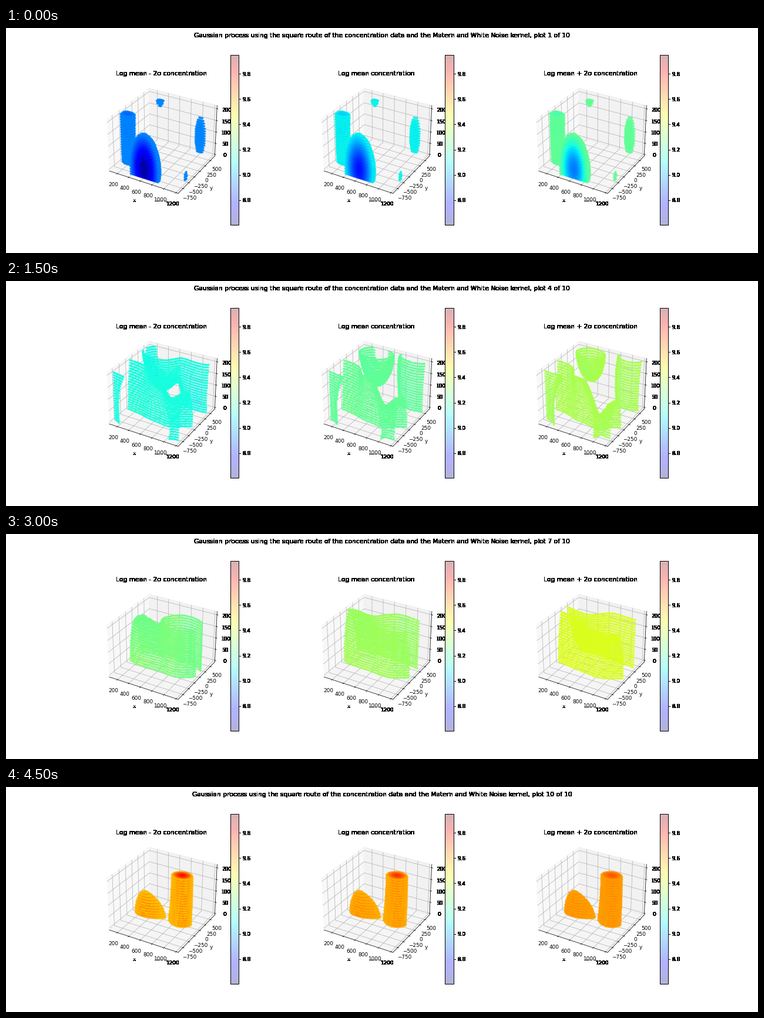
A matplotlib script that plays this animation: 1280x384 px, repeating every 5 s.

```python
import numpy as np
import matplotlib.pyplot as plt
from matplotlib.animation import FuncAnimation
from matplotlib.cm import ScalarMappable
from matplotlib.colors import Normalize

W, H, DPI = 1280, 384, 64
PLOTS = 10
LOW = np.array([53.7, -949.0, -7.5])
SPAN = np.array([1180.0, 1675.0, 221.5])

# Gaussian bumps in unit box coordinates: amplitude, x, y, z, vertical width
WELLS = [(-.21, .12, .29, .5, 3), (-.39, .5, .04, .2, .73), (-.175, .28, .8, 1, .75),
         (-.185, .8, .97, .35, 1.2), (-.172, .98, .28, .1, .6)]
PEAKS = [(.34, .74, .56, .5, 3), (.31, .17, .52, 0, .75), (.2, .38, .58, 0, .6)]
BACKGROUND = .53

# sign of the two sigma shift in each panel
PANELS = [("Log mean - 2σ concentration", -1),
          ("Log mean concentration", 0),
          ("Log mean + 2σ concentration", 1)]


def make_field(shape):
    x, y, z = np.meshgrid(*(np.linspace(.042, .958, n) for n in shape), indexing="ij")
    total = np.full(shape, BACKGROUND)
    for bumps, width in ((WELLS, .18), (PEAKS, .15)):
        for amp, cx, cy, cz, tall in bumps:
            r2 = ((x - cx) / (1.2 * width)) ** 2 + ((y - cy) / width) ** 2
            total += amp * np.exp(-r2 - ((z - cz) / tall) ** 2)
    return (x, y, z), total


def level(plot, sign):
    """Cubic rise of the level; the shifted panels run ahead or behind midway."""
    step = plot - .9 * sign * np.sin(np.pi * plot / (PLOTS - 1))
    return np.polyval([.00081, .0022, .0228, .4985], step - (PLOTS - 1) / 2)


def select(plot, sign):
    """Solid regions at both ends, thin level surfaces in between."""
    inside = values > level(plot, sign)
    if plot == 0:
        return ~inside
    if plot == PLOTS - 1:
        return inside
    edge = np.zeros_like(inside)
    for axis in range(3):
        crossing = np.diff(inside, axis=axis)
        np.moveaxis(edge, axis, 0)[1:] |= np.moveaxis(crossing, axis, 0)
    return edge


def tone(value, sign):
    return value + sign * (.105 - .4 * np.maximum(value - .5, 0))


def solid(img, dpi):
    """Turn every touched pixel fully black, as lost transparency does."""
    out = np.zeros_like(img)
    out[..., 3] = img[..., 3] > 0
    return out, 0, 0


def add_text(x, y, text, va):
    label = fig.text(x, y, text, ha="center", va=va, size=12)
    label.set_agg_filter(solid)
    return label


def add_box(rect):
    ax = fig.add_axes(rect, projection="3d")
    limits = zip(LOW, LOW + SPAN)
    ax.set(xlim=next(limits), ylim=next(limits), zlim=next(limits),
           xlabel="x", ylabel="y", xticks=range(200, 1201, 200),
           yticks=range(-750, 501, 250), zticks=range(0, 201, 50))
    return ax


def add_colorbar(left, bottom, height):
    cax = fig.add_axes([left, bottom, height * H / 20 / W, height])
    bar = fig.colorbar(ScalarMappable(Normalize(8.605, 9.948), "jet"), cax=cax)
    bar.solids.set_alpha(.3)
    bar.outline.set_agg_filter(solid)
    cax.yaxis.set_agg_filter(solid)


fig = plt.figure(figsize=(W / DPI, H / DPI), dpi=DPI, facecolor="white")
heading = add_text(.5, .98, "", "top")
grid, values = make_field((70, 85, 20))

cell = .775 / 3.8
bottom, height = .125, .755
boxes, clouds = [], []
for k, (title, _) in enumerate(PANELS):
    left = .125 + 1.4 * cell * k
    rect = [left, bottom, .8 * cell, height]
    # Labels outside the white box stay hard black, inside they are smooth
    ghost = add_box(rect)
    ghost.xaxis.set_agg_filter(solid)
    ghost.zaxis.set_agg_filter(solid)
    boxes.append(add_box(rect))
    add_colorbar(left + .85 * cell, bottom, height)
    top = bottom + height / 2 + .4 * cell * W / H
    add_text(left + .4 * cell, top + 6 / 72 * DPI / H, title, "baseline")


def draw(plot):
    while clouds:
        clouds.pop().remove()
    for ax, (_, sign) in zip(boxes, PANELS):
        mask = select(plot, sign)
        points = (lo + span * g[mask] for lo, span, g in zip(LOW, SPAN, grid))
        clouds.append(ax.scatter(*points, c=tone(values[mask], sign), cmap="jet",
                                 vmin=0, vmax=1, s=7, alpha=.7, depthshade=False))
    heading.set_text("Gaussian process using the square route of the concentration data "
                     f"and the Matern and White Noise kernel, plot {plot + 1} of {PLOTS}")
    return clouds


anim = FuncAnimation(fig, draw, frames=PLOTS, interval=500, repeat=True)
plt.show()
```
